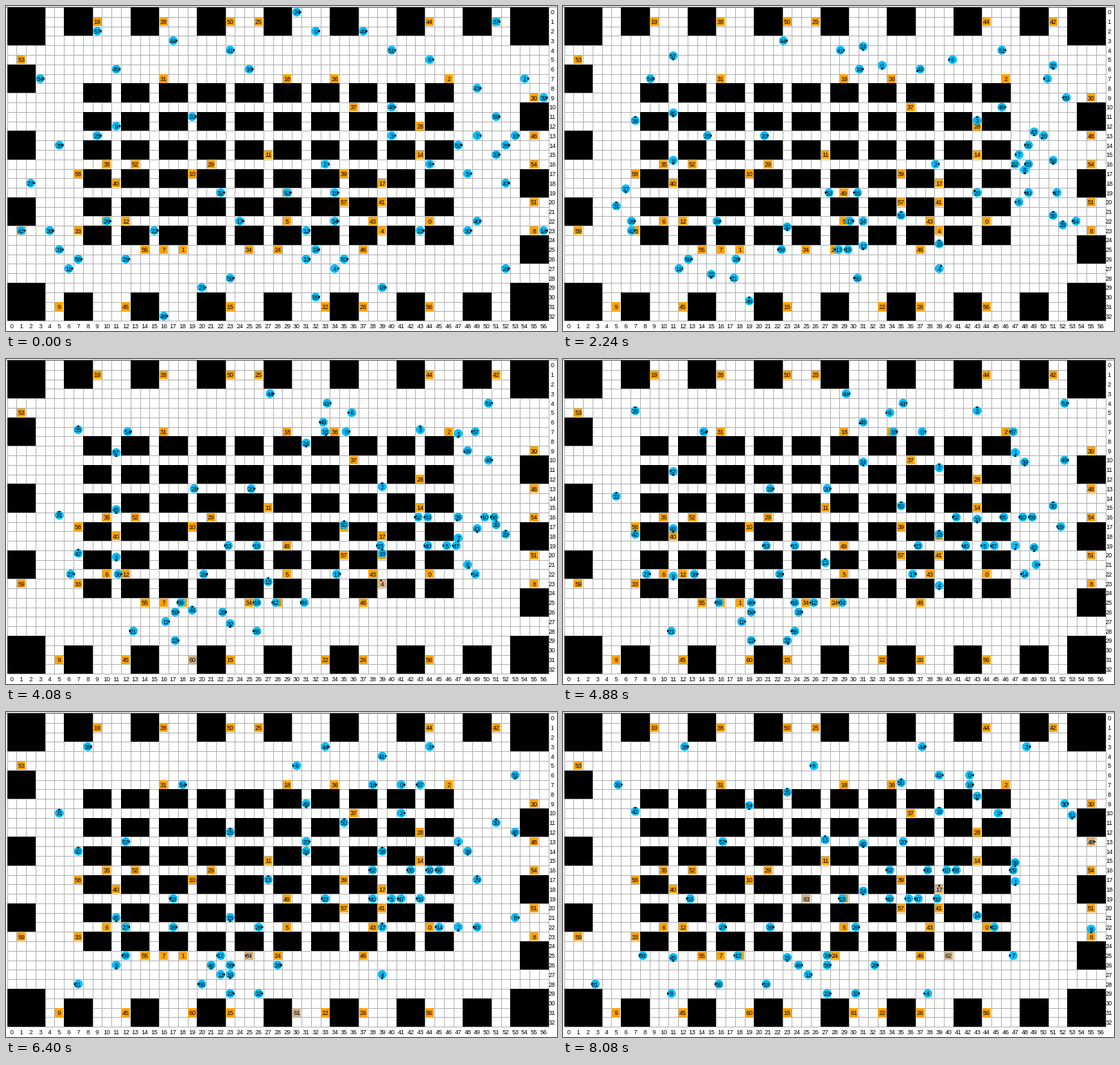
These frames come from a looping animation (800x472 px, 8160 ms). A matplotlib script:

```python
import matplotlib.pyplot as plt
import numpy as np
from matplotlib.animation import FuncAnimation
from matplotlib.collections import LineCollection
from matplotlib.patches import Rectangle

W, H, DPI = 800, 472, 80
PT = 72 / DPI
FRAMES, INTERVAL = 102, 80
STEPS = 5                      # frames per tick
TICKS = FRAMES // STEPS + 1
COLS, ROWS = 57, 33
CELL, X0, Y0 = 13.79, 1.5, 2.1
BLUE, ORANGE, FRESH = "deepskyblue", "orange", "tan"

fig = plt.figure(figsize=(W / DPI, H / DPI), dpi=DPI, facecolor="white")
ax = fig.add_axes([0, 0, 1, 1])
ax.set(xlim=(0, W), ylim=(H, 0))
ax.axis("off")


def px(col):
    return X0 + CELL * (col + 0.5)


def py(row):
    return Y0 + CELL * (row + 0.5)


def label(x, y, text, z):
    return ax.text(x, y, str(text), family="Liberation Sans", fontsize=9 * PT,
                   ha="center", va="center_baseline", zorder=z)


def block(col, row, w, h):
    ax.add_patch(Rectangle((X0 + col * CELL, Y0 + row * CELL), w * CELL, h * CELL,
                           color="black", lw=0, zorder=2))


# Floor
right, bottom = X0 + COLS * CELL, Y0 + ROWS * CELL
lines = [[(X0 + c * CELL, Y0), (X0 + c * CELL, bottom)] for c in range(COLS + 1)]
lines += [[(X0, Y0 + r * CELL), (right, Y0 + r * CELL)] for r in range(ROWS + 1)]
ax.add_collection(LineCollection(lines, colors="#b0b0b0", linewidths=PT, zorder=1))
ax.plot([0, W], [0.5, 0.5], color="#808080", lw=PT, zorder=1)

for col in (0, 53):
    block(col, 0, 4, 4)
    block(col, 29, 4, 4)
for col in range(6, 49, 7):
    block(col, 0, 3, 3)
    block(col, 30, 3, 3)
for row in (6, 13, 20):
    block(0, row, 3, 3)
    block(54, row + 4, 3, 3)
for col in range(8, 45, 4):
    for row in range(8, 24, 3):
        block(col, row, 3, 2)

for c in range(COLS):
    label(px(c), 464, c, 1)
for r in range(ROWS):
    label(793, py(r), r, 1)

# Tasks
tasks = []


def task(col, row, name, born=-1, done=99):
    side = 12.2
    box = Rectangle((px(col) - side / 2, py(row) - side / 2), side, side,
                    color=ORANGE, lw=0, zorder=3)
    ax.add_patch(box)
    tasks.append((box, label(px(col), py(row), name, 4), born, done))


DONE = {4: 10, 34: 16, 17: 20, 48: 20}


def task_row(row, names):
    for col, name in names.items():
        task(col, row, name, done=DONE.get(name, 99))


task_row(1, {9: 19, 16: 38, 23: 50, 26: 25, 44: 44, 51: 42})
task_row(5, {1: 53})
task_row(7, {16: 31, 29: 18, 34: 36, 46: 2})
task_row(9, {55: 30})
task_row(10, {36: 37})
task_row(12, {43: 28})
task_row(13, {55: 48})
task_row(15, {27: 11, 43: 14})
task_row(16, {10: 35, 13: 52, 21: 29, 55: 54})
task_row(17, {7: 58, 19: 10, 35: 39})
task_row(18, {11: 40, 39: 17})
task_row(19, {29: 49})
task_row(20, {35: 57, 39: 41, 55: 51})
task_row(22, {10: 6, 12: 12, 29: 5, 38: 43, 44: 0})
task_row(23, {1: 59, 7: 33, 39: 4, 55: 8})
task_row(25, {14: 55, 16: 7, 18: 1, 25: 34, 28: 24, 37: 46})
task_row(31, {5: 9, 12: 45, 23: 15, 33: 22, 37: 26, 44: 56})
task(19, 31, 60, born=10)
task(30, 31, 61, born=16)
task(40, 25, 62, born=20)
task(25, 19, 63, born=20)

# Robots: one tick per cell, per quarter turn, or per pause (P)
MOVES = {"E": (1, 0), "S": (0, 1), "W": (-1, 0), "N": (0, -1)}
names, routes = [], []


def robot(name, x, y, plan):
    head = 0
    poses = [(x, y, head)]
    for step in plan.split():
        kind, count = step[0], int(step[1:])
        dx = dy = 0
        if kind != "P":
            turn = ("ESWN".index(kind) - head + 2) % 4 - 2
            for _ in range(abs(turn)):
                head += 1 if turn > 0 else -1
                poses.append((x, y, head))
            dx, dy = MOVES[kind]
        for _ in range(count):
            x, y = x + dx, y + dy
            poses.append((x, y, head))
    poses += [poses[-1]] * (TICKS + 1)
    names.append(name)
    routes.append(poses[:TICKS + 1])


robot(0, 32, 2, "E1 S5 E9 N1 E1")
robot(1, 54, 7, "W7 S11")
robot(2, 33, 16, "E6 N6 E7")
robot(3, 40, 13, "E3 N10 E6")
robot(4, 34, 27, "E5 N4 S6 W2")
robot(5, 48, 17, "S3 W1 N1 W12")
robot(6, 44, 5, "W19")
robot(7, 49, 13, "S2 W2 S4 P2 S6 W1")
robot(8, 44, 16, "E4 S5 E7 S2")
robot(9, 11, 12, "S0 P1 S17 W1")
robot(10, 53, 13, "W3 S3 W11")
robot(11, 6, 27, "E16 P1 E4")
robot(12, 31, 23, "S0 P3 S2 W14")
robot(13, 31, 26, "N1 W4 N13")
robot(14, 56, 23, "N1 W8 P2 W5 N2")
robot(15, 34, 19, "W11 S7")
robot(16, 25, 6, "E8 S1 E10")
robot(17, 24, 22, "E15 N4 P1")
robot(18, 39, 29, "N20")
robot(19, 32, 25, "W0 P1 W4 P1 W5 S3 W3")
robot(20, 19, 11, "S2 E17")
robot(21, 20, 29, "N1 W18")
robot(22, 15, 23, "S6 E13")
robot(23, 43, 23, "N4 W15")
robot(24, 30, 0, "E1 S19")
robot(25, 9, 13, "E14 N6")
robot(26, 10, 22, "E21")
robot(27, 2, 18, "E4 S4 E11")
robot(28, 12, 26, "E21")
robot(29, 52, 27, "N10 W3 N1 W3")
robot(30, 48, 23, "E3 N14 E2")
robot(31, 5, 25, "N18 E1")
robot(32, 22, 19, "E1 S10 E8")
robot(33, 51, 15, "S1 W8 S3 W5")
robot(34, 34, 22, "W3 S3 W6 E3")
robot(35, 52, 14, "W5 S2 W10")
robot(36, 4, 23, "E2 N1 E16")
robot(37, 51, 1, "S6 W8 P2 S2")
robot(38, 5, 14, "E2 N11 E6")
robot(39, 56, 9, "W8 S6 W1 S1")
robot(40, 49, 22, "N3 W16")
robot(41, 23, 4, "E16 S2 E0 P1")
robot(42, 1, 23, "E6 N14")
robot(43, 49, 8, "S14 W5")
robot(44, 17, 3, "E21")
robot(45, 11, 6, "S20")
robot(46, 16, 32, "E3 N7 E2 S1 E4")
robot(47, 52, 18, "E1 S1 W17")
robot(48, 40, 10, "E13 S3 E2 P1")
robot(49, 37, 2, "S4 W6 S8")
robot(50, 35, 26, "N20")
robot(51, 40, 4, "E13 S7")
robot(52, 47, 14, "S0 P2 S2 W7 P1 W7")
robot(53, 29, 19, "E1 W18")
robot(54, 3, 7, "E7 P1 E9 S3")
robot(55, 32, 30, "N2 W17")
robot(56, 7, 26, "E21")
robot(57, 9, 2, "E2 S11 E6")
robot(58, 51, 11, "S5 W0 P3 W11")
robot(59, 23, 28, "N3 W16")

poses = np.array(routes, float).transpose(1, 0, 2)


def discs(diameter, color, z):
    zeros = np.zeros(len(names))
    return ax.scatter(zeros, zeros, s=(diameter * PT) ** 2, c=[color] * len(names),
                      linewidths=0, zorder=z)


bodies = discs(12.8, BLUE, 5)
noses = discs(2.8, "black", 6)
tags = [label(0, 0, name, 7) for name in names]


def update(frame):
    tick, part = divmod(frame, STEPS)
    f = part / STEPS
    x, y, head = (poses[tick] * (1 - f) + poses[tick + 1] * f).T
    x, y, angle = px(x), py(y), head * np.pi / 2
    bodies.set_offsets(np.c_[x, y])
    bodies.set_facecolor([FRESH if DONE.get(n) == tick else BLUE for n in names])
    noses.set_offsets(np.c_[x + 4.9 * np.cos(angle), y + 4.9 * np.sin(angle)])
    for tag, tx, ty in zip(tags, x, y):
        tag.set_position((tx, ty))
    for box, text, born, done in tasks:
        shown = born <= tick <= done
        box.set_visible(shown)
        text.set_visible(shown and tick < done)
        box.set_color(FRESH if tick == born else ORANGE)
    return []


anim = FuncAnimation(fig, update, frames=FRAMES, interval=INTERVAL, repeat=True)
plt.show()
```
